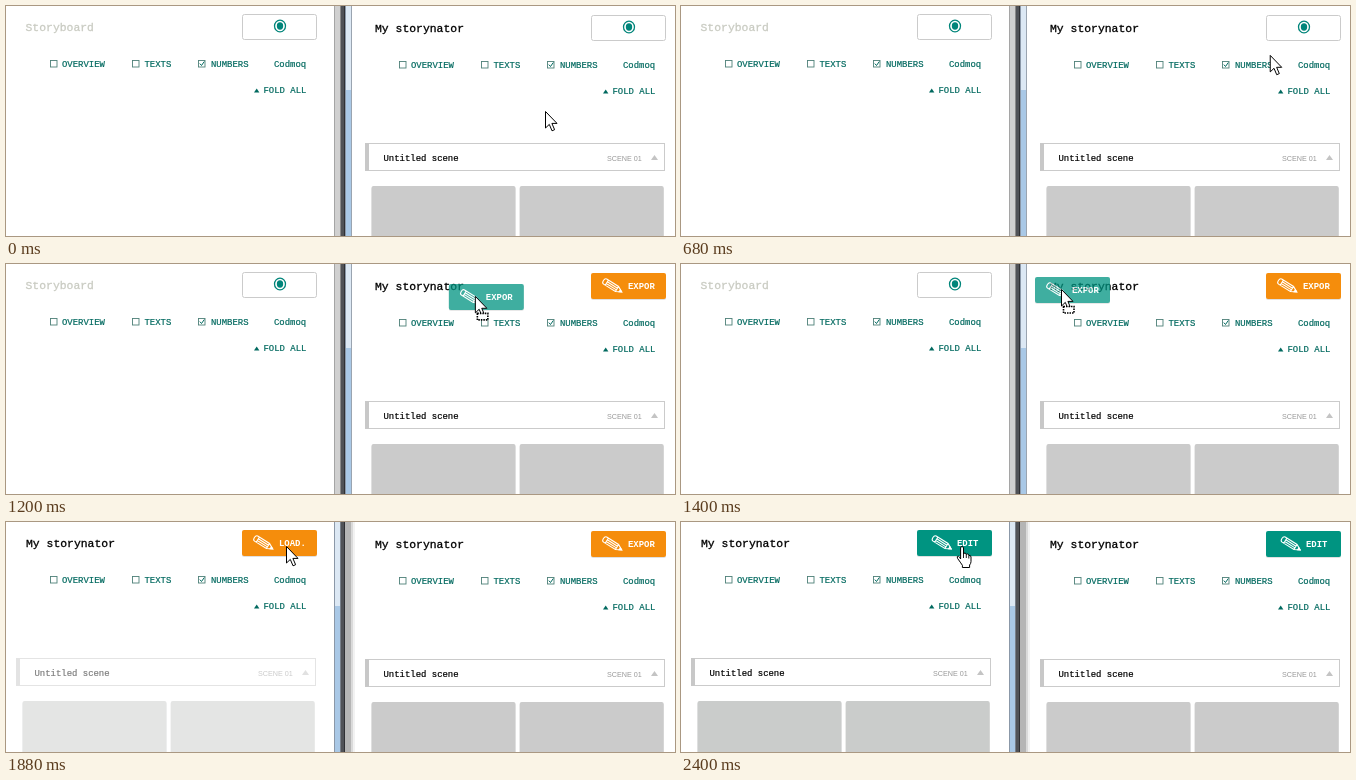
Recreate the animation shown at these times as an HTML page. Size 669 by 230 pixels, loop 3.04 s.

```html
<!DOCTYPE html>
<html lang="en">
<head>
<meta charset="utf-8">
<title>Storyboard drag and drop</title>
<style>
  html, body { margin: 0; width: 100%; height: 100%; overflow: hidden; background: #fff; }
  svg { display: block; width: 669px; height: 230px; }
  text { font: 8.95px "Liberation Mono", "Courier New", monospace; stroke-width: .2px; white-space: pre; }
  .title { font-size: 11.42px; stroke-width: .3px; }
  .label { font-weight: bold; stroke: none; }
  .scene { font: 7.2px "Liberation Sans", Arial, sans-serif; stroke: none; }
</style>
</head>
<body>
<svg id="stage" viewBox="0 0 669 230">
  <rect width="669" height="230" fill="#fff"/>
  <g id="frame"></g>
  <g id="left" transform="translate(-349 -1)"></g>
  <g id="right"></g>
  <g id="drag"></g>
  <g id="cursor"></g>
</svg>
<script>
const LOOP = 3040, STEP = 40;
const WHITE = [255, 255, 255], TEAL = [0, 148, 129], ORANGE = [245, 141, 12];
const INK = '#00695f', GREY = '#cbcbcb';
const $ = id => document.getElementById(id);
const clamp = v => Math.max(0, Math.min(1, v));
const ramp = (t, from, span) => clamp((t - from) / span);
const mix = (a, b, p) => `rgb(${a.map((v, i) => Math.round(v + (b[i] - v) * p))})`;
const box = (x, y, w, h, fill, more = '') =>
  `<rect x="${x}" y="${y}" width="${w}" height="${h}" fill="${fill}" ${more}/>`;
const path = (d, fill, more = '') => `<path d="${d}" fill="${fill}" ${more}/>`;
const text = (x, y, s, color, cls = '') =>
  `<text x="${x}" y="${y}" fill="${color}" stroke="${color}" class="${cls}">${s}</text>`;

// Panels are drawn in the coordinates of the right window.
function checkbox(x, checked) {
  return box(x + .5, 55.5, 6.5, 6.5, 'none', 'stroke="#4f8179" stroke-width=".9"') +
    (checked ? path(`M${x + 1.8} 58.6l1.7 1.9 2.8-4`, 'none', `stroke="${INK}"`) : '');
}

function menu() {
  return checkbox(393) + text(405, 61.6, 'OVERVIEW', INK) +
    checkbox(475) + text(487.5, 61.6, 'TEXTS', INK) +
    checkbox(541, true) + text(554, 61.6, 'NUMBERS', INK) +
    text(617, 61.6, 'Codmoq', INK) +
    path('M597 87.5l2.7-4 2.7 4z', INK) + text(606.5, 88, 'FOLD ALL', INK);
}

function scene(fill) {
  const card = x => box(x, 181, 144, 60, '#e6e6e6', 'rx="2"') + box(x, 180, 144, 60, fill, 'rx="2"');
  return box(359.5, 137.5, 299, 27, '#fff', `stroke="${GREY}"`) +
    box(359, 137, 4, 28, '#c8c8c8') +
    text(377.5, 155, 'Untitled scene', '#000') +
    text(601, 155.2, 'SCENE 01', '#999', 'scene') +
    path('M645 154l3.5-5 3.5 5z', '#c4c4c4') + card(365.5) + card(513.7);
}

function pencil(x) {
  return `<g transform="translate(${x} 14) rotate(32)" fill="none" stroke="#fff" stroke-width="1.1">` +
    '<path d="M2 0H16L21.5 3 16 6H2Q0 6 0 3T2 0ZM4 0V6M4 2H16M4 4H16M16 0V6"/>' +
    path('M19.3 1.8l2.2 1.2-2.2 1.2z', '#fff') + '</g>';
}

const EYE = '<ellipse cx="623" cy="21" rx="5.5" ry="5.9" fill="#fff" stroke="#00857a" stroke-width="1.3"/>' +
  '<ellipse cx="623" cy="21" rx="3.2" ry="3.7" fill="#00857a"/>';
const ICONS = {
  EDIT: pencil(602.5) + text(625, 25, 'EDIT', '#fff', 'label'),
  EXPOR: pencil(599) + text(622, 25, 'EXPOR', '#fff', 'label'),
  'LOAD.': pencil(599) + text(622, 25, 'LOAD.', '#fff', 'label'),
  INSERT: path('M599 16v12h12z', '#fff') + text(616, 25, 'INSERT', '#fff', 'label')
};

function button(label, fill) {
  if (!label) return box(585.5, 9.5, 74, 25, '#fff', `rx="2" stroke="${GREY}"`) + EYE;
  return box(585, 10, 75, 26, '#000', 'rx="2" opacity=".12"') +
    box(585, 9, 75, 26, fill, 'rx="2"') + ICONS[label];
}

function frame(leftActive) {
  const dark = box(335, 0, 4, 230, '#505257') + box(338, 0, 1, 230, '#2f3034');
  const glass = x => box(x, 0, 5, 84, '#dce8f4') + box(x, 84, 5, 146, '#a9c8e6');
  return leftActive
    ? box(328, 0, 1, 230, '#8b98a8') + glass(329) + box(334, 0, 1, 230, '#777f8a') + dark +
      box(339, 0, 6, 230, '#b5b5b5') + box(345, 0, 2, 230, '#dadada') + box(347, 0, 2, 230, '#f2f2f2')
    : box(328, 0, 1, 230, '#a5a5a5') + box(329, 0, 5, 230, '#d0d0d0') + box(334, 0, 1, 230, '#8a8a8a') + dark +
      box(339, 0, 1, 230, '#8b98a8') + glass(340) + box(345, 0, 1, 230, '#9aa4b0');
}

const EDGE = 'stroke="#000" stroke-width="1" stroke-linejoin="round"';
const ARROW = path('M.5 .5V17L4.3 13.4 7 19.8 9.6 18.7 6.9 12.4H12Z', '#fff', EDGE);
const PARCEL = box(2.5, 17.5, 10.5, 6.5, '#fff', 'stroke="#000" stroke-width="1.6" stroke-dasharray="1.5 1"');
const HAND = path('M4.6 13V2Q4.6.5 6 .5T7.5 2V8Q7.7 7 9 7.1T10.3 8.6Q10.6 7.8 11.7 8T12.8 9.5Q14.9 9 15 11V15.5' +
  'Q15 17.5 13.6 19V21.5H6.4V19.3Q4.5 16.5 1.5 12.3 .6 10.2 2.3 10.2 3.6 10.6 4.6 13Z', '#fff', EDGE) +
  path('M7.5 8V12M10.3 8.6V12M12.8 9.6V12.5', 'none', 'stroke="#000" stroke-width=".9"');

function pointer(t) {
  if (t < 320) return [539, 105];
  if (t <= 880) {
    const p = ramp(t, 280, 560);
    return [539 + 72 * p ** 1.1, 105 - 84 * p ** 1.2];
  }
  if (t <= 1400) {
    const p = ramp(t, 880, 520);
    return [611 - 231 * p, 21 + 4 * p + 9 * Math.sin(Math.PI * p)];
  }
  const p = 1 - (1 - ramp(t, 1400, 440)) ** 3.2;
  return [380 - 100 * p, 25 - p];
}

function rightButton(t) {
  if (t < 760) return button();
  if (t < 920) return button('EDIT', mix(WHITE, TEAL, ramp(t, 720, 120)));
  if (t < 2000) return button('EXPOR', mix(TEAL, ORANGE, ramp(t, 880, 120)));
  return button('EDIT', mix(TEAL, TEAL, 0));
}

function leftButton(t) {
  if (t < 1560) return button();
  if (t < 1840) return button('INSERT', mix(WHITE, ORANGE, ramp(t, 1520, 80)));
  if (t < 2280) return button('LOAD.', mix(ORANGE, ORANGE, 0));
  return button('EDIT', mix(ORANGE, TEAL, ramp(t, 2240, 160)));
}

function draw(t) {
  const loaded = t >= 1840, dragging = t >= 920 && t < 1840;
  const [x, y] = pointer(t);
  $('frame').innerHTML = frame(loaded);
  $('left').innerHTML = menu() + leftButton(t) + (loaded
    ? text(369, 26, 'My storynator', '#000', 'title') +
      `<g opacity="${ramp(t, 1800, 160)}">${scene('#cacccb')}</g>`
    : text(368.5, 26, 'Storyboard', '#c9cbc2', 'title'));
  $('right').innerHTML = text(369, 26, 'My storynator', '#000', 'title') +
    menu() + scene('#cbcbcb') + rightButton(t);
  $('drag').innerHTML = dragging
    ? `<g opacity=".75" transform="translate(${x - 611} ${y - 21})">${button('EXPOR', mix(TEAL, TEAL, 0))}</g>` : '';
  const hand = t >= 2000 || (t >= 760 && t < 920);
  $('cursor').setAttribute('transform', `translate(${hand ? x - 5 : x} ${y})`);
  $('cursor').innerHTML = hand ? HAND : ARROW + (dragging ? PARCEL : '');
}

const start = performance.now();
let last = -1;
function tick() {
  const t = Math.floor(((performance.now() - start) % LOOP) / STEP) * STEP;
  if (t !== last) draw(last = t);
  requestAnimationFrame(tick);
}
tick();
</script>
</body>
</html>
```
